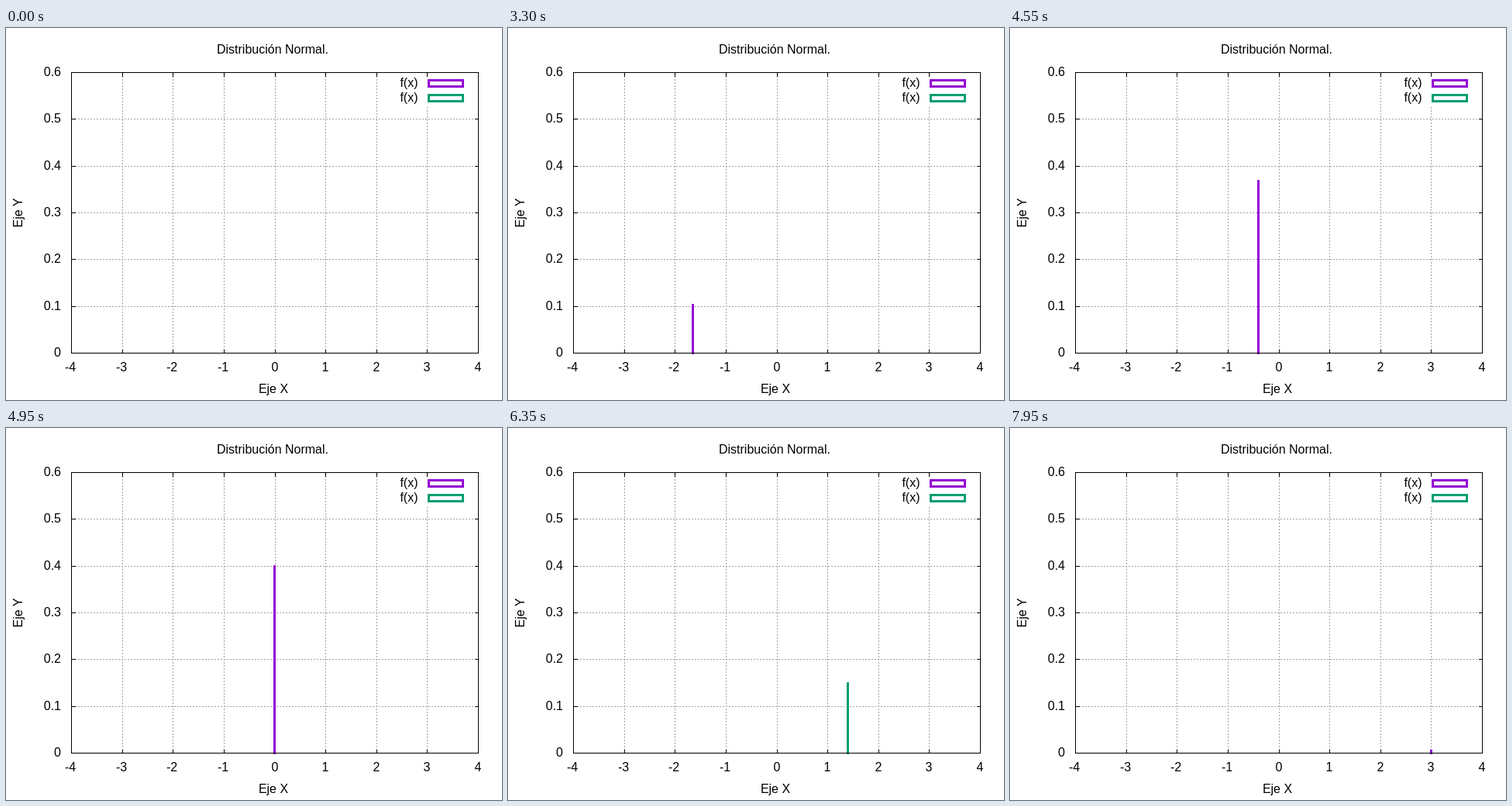
These frames come from a looping animation (640 by 480 pixels, 8 s). An HTML page:

```html
<!DOCTYPE html>
<html lang="es">
<head>
<meta charset="utf-8">
<title>Distribución Normal</title>
<style>
  html, body { margin: 0; width: 100%; height: 100%; overflow: hidden; background: #fff; }
  svg { display: block; }
  text { font: 16px "Liberation Sans", Arial, sans-serif; }
  path, rect { fill: none; shape-rendering: crispEdges; }
</style>
</head>
<body>
<svg id="plot" width="640" height="480" viewBox="0 0 640 480"></svg>
<script>
const LEFT = 84, RIGHT = 609, TOP = 57, BOTTOM = 419;
const PURPLE = '#9400d3', GREEN = '#009e73';
const LOOP = 8000, START = 1000, STEP = 50;
const svg = document.getElementById('plot');

const px = x => LEFT + (x + 4) * (RIGHT - LEFT) / 8;
const py = y => BOTTOM - y * (BOTTOM - TOP) / 0.6;
const density = x => Math.exp(-x * x / 2) / Math.sqrt(2 * Math.PI);

function add(tag, attrs, content = '') {
  const el = document.createElementNS('http://www.w3.org/2000/svg', tag);
  for (const name in attrs) el.setAttribute(name, attrs[name]);
  el.textContent = content;
  return svg.appendChild(el);
}
const label = (s, x, y, anchor = 'middle', more = {}) =>
  add('text', { x, y, 'text-anchor': anchor, ...more }, s);
const line = (d, stroke = '#000', more = {}) =>
  add('path', { d, stroke, transform: 'translate(.5 .5)', ...more });
const gridLine = d => line(d, '#a0a0a0', { 'stroke-dasharray': '2 2' });

let tics = '';
for (let i = 1; i < 6; i++) {
  const y = Math.round(py(i / 10));
  gridLine(`M${LEFT} ${y}H${RIGHT}`);
  tics += `M${LEFT} ${y}h5M${RIGHT} ${y}h-5`;
}
for (let i = -3; i < 4; i++) {
  const x = Math.round(px(i));
  gridLine(`M${x} ${BOTTOM}V${i === 3 ? 99 : TOP}`); // leaves room for the key
  tics += `M${x} ${BOTTOM}v-5M${x} ${TOP}v5`;
}
line(tics);

for (let i = 0; i < 7; i++) label(String(i / 10), 71, Math.round(py(i / 10)) + 5, 'end');
for (let i = -4; i < 5; i++) label(String(i), Math.round(px(i)) - (i < 0 ? 1 : 0), 443);
label('Distribución Normal.', 344, 33);
label('Eje X', 345, 471);
label('Eje Y', 0, 0, 'middle', { transform: 'translate(21 238.5) rotate(-90)' });

[PURPLE, GREEN].forEach((stroke, i) => {
  label('f(x)', 531.5, 76 + 19 * i, 'end');
  add('rect', { x: 545.5, y: 67.5 + 19 * i, width: 44, height: 8, stroke, 'stroke-width': 3 });
});

const bar = add('rect', { width: 3 });
line(`M${LEFT} ${TOP}H${RIGHT}V${BOTTOM}H${LEFT}Z`);

function draw(now) {
  const n = Math.floor((now % LOOP - START) / STEP) + 1;
  const x = (n - 80) / 20;
  const top = Math.round(py(density(x))) - 1;
  bar.setAttribute('visibility', n > 0 ? 'visible' : 'hidden');
  bar.setAttribute('x', Math.round(px(x) - 0.01) - 1);
  bar.setAttribute('y', top);
  bar.setAttribute('height', BOTTOM + 2 - top);
  bar.style.fill = x >= 1 && x <= 2 ? GREEN : PURPLE;
}

const begin = performance.now();
function tick() {
  draw(performance.now() - begin);
  requestAnimationFrame(tick);
}
tick();
</script>
</body>
</html>
```
